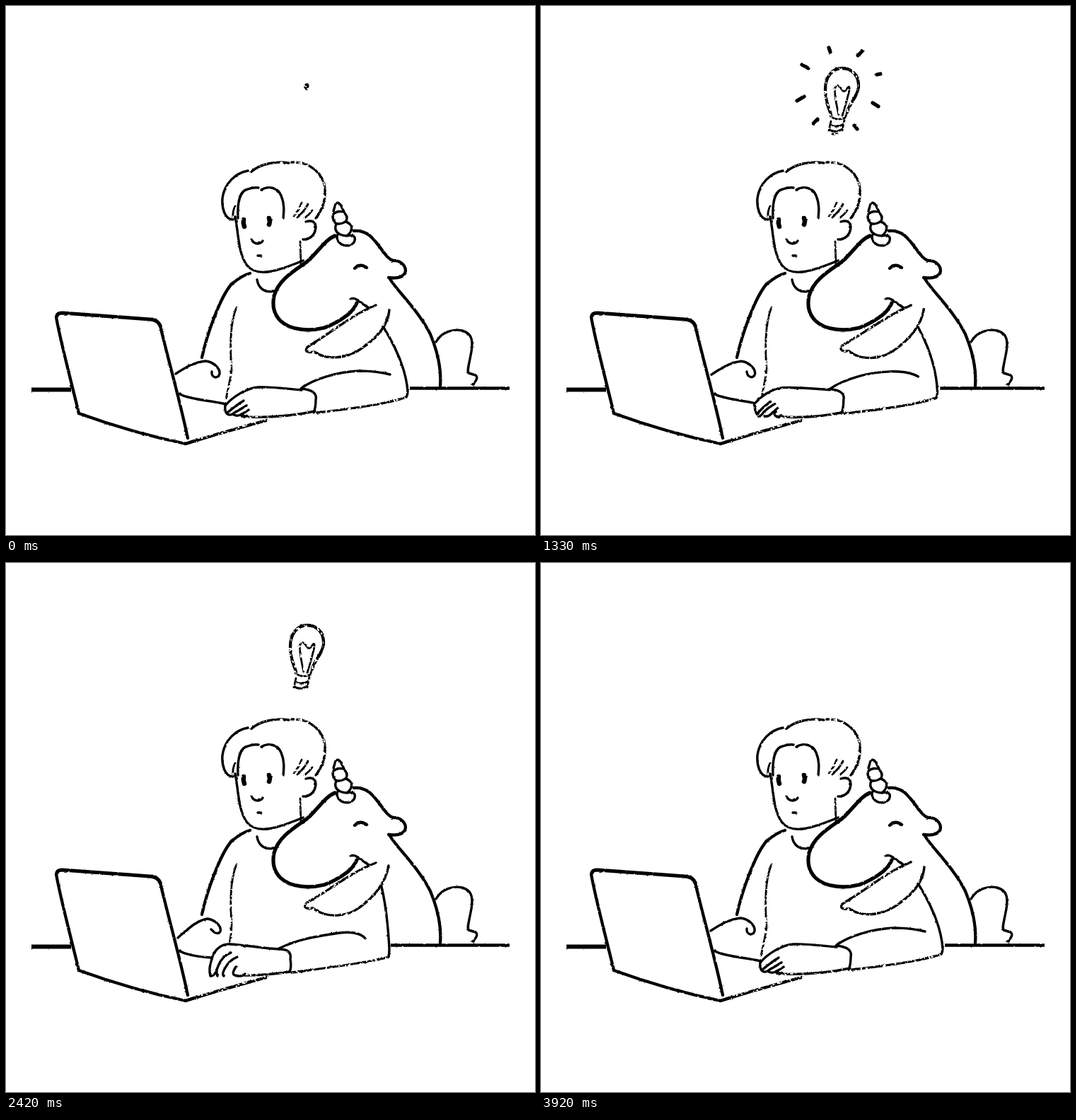
Recreate the animation shown at these times as an HTML page. Size 748 by 748 pixels, loop 4000 ms.

```html
<!DOCTYPE html>
<html lang="en">
<head>
<meta charset="utf-8">
<title>Bright idea at the laptop</title>
<style>
  html, body { margin: 0; width: 100%; height: 100%; overflow: hidden; background: #fff; }
  svg { display: block; width: 748px; height: 748px; }
  path { vector-effect: non-scaling-stroke; }
  .ink { fill: none; stroke: #000; stroke-width: 3.4; stroke-linecap: round; stroke-linejoin: round; }
  .fine { stroke-width: 2.8; }
  .bold { stroke-width: 4.3; }
  .heavy { stroke-width: 5.2; }
</style>
</head>
<body>
<svg viewBox="0 0 748 748">
  <defs>
    <filter id="rough" filterUnits="userSpaceOnUse" x="0" y="0" width="748" height="748" color-interpolation-filters="sRGB">
      <feTurbulence type="fractalNoise" baseFrequency=".2" numOctaves="2" seed="4"/>
      <feDisplacementMap in="SourceGraphic" scale="2.2" xChannelSelector="R" yChannelSelector="G"/>
    </filter>
    <filter id="dry" filterUnits="userSpaceOnUse" x="0" y="0" width="748" height="748" color-interpolation-filters="sRGB">
      <feTurbulence type="fractalNoise" baseFrequency=".25" numOctaves="2" seed="9" result="n"/>
      <feDisplacementMap in="SourceGraphic" in2="n" scale="2.4" xChannelSelector="R" yChannelSelector="G" result="d"/>
      <feColorMatrix in="n" type="matrix" values="0 0 0 0 0  0 0 0 0 0  0 0 0 0 0  0 0 0 14 -4.6"/>
      <feComposite in="d" operator="in"/>
    </filter>
    <clipPath id="bulbClip"><circle id="bulbHole" cx="425" cy="114"/></clipPath>
    <clipPath id="wireClip"><circle id="wireHole" cx="425" cy="116"/></clipPath>
  </defs>
  <rect width="748" height="748" fill="#fff"/>

  <g class="ink" filter="url(#rough)">
    <!-- desk and laptop -->
    <path d="M36 542.5H92" stroke-width="6" stroke-linecap="butt"/>
    <path id="desk" class="bold" stroke-linecap="butt"/>
    <path class="heavy" d="M72 438Q73 434 80 434L203 443Q215 444 218 452"/>
    <path class="bold" d="M71 440C76 470 92 530 103 576"/>
    <path class="bold" d="M218 452C228 495 246 558 257 611"/>
    <path class="bold" d="M103 576C150 593 205 609 254 619L266 615"/>
    <!-- face and hair -->
    <path d="M324 298C329 322 328 350 341 367C356 385 386 374 420 360"/>
    <path d="M336 302Q335 307 337 312M372 300Q374 305 372 309" style="stroke-width:6.5"/>
    <path d="M347 330Q350 336 356 336Q362 335 363 332M356 353H361"/>
    <path d="M424 305Q437 301 438 313C437 325 428 331 420 330"/>
    <path d="M328 300C327 280 330 261 342 259Q350 256 357 257M361 260C370 254 384 256 389 268C394 280 393 290 392 300"/>
    <path d="M321 302C309 302 305 285 306 272C309 250 325 236 342 233"/>
    <path d="M355 387C357 400 367 406 378 403"/>
    <path class="bold" d="M277 497C284 465 302 413 319 393C329 385 337 380 345 378"/>
    <!-- unicorn -->
    <path class="bold" d="M492 318C515 316 523 335 537 352Q544 361 551 360C562 362 567 371 564 378C559 386 548 385 541 384"/>
    <path class="heavy" d="M465 325C450 331 440 350 425 362C405 376 385 388 379 410C376 425 379 436 388 445C402 459 430 460 450 455C464 450 475 443 484 436Q492 429 496 420"/>
    <path d="M487 414Q493 412 500 418L513 427"/>
    <path class="bold" d="M493 371Q501 363 510 370"/>
    <path d="M463 290L466 280Q469 276 473 281L478 291M463 294Q470 288 478 292Q484 298 481 304Q473 310 466 307Q460 300 463 294M467 308Q464 315 468 320Q474 325 482 325Q491 318 488 311Q485 306 480 305M470 321Q466 328 470 333Q476 341 487 338Q495 334 493 327Q490 323 482 325"/>
    <path class="bold" d="M543 386C553 403 583 430 600 464C610 488 616 512 614 537"/>
    <path d="M608 475C616 461 632 456 645 459C660 463 661 475 657 494C654 510 652 515 654 519L664 522Q669 526 660 535"/>
    <path id="edge"/>
    <path id="lap"/>
    <path id="palm"/>
    <path id="hand"/>
    <path id="cuff"/>
    <path id="sleeve"/>
    <g id="fingers"></g>
    <g id="rays" class="heavy"></g>
  </g>

  <g class="ink" filter="url(#dry)">
    <path d="M254 619L300 605L368 586" class="bold"/>
    <path d="M346 235C360 222 385 219 400 222"/>
    <path d="M404 221C430 219 449 238 451 258C452 275 446 290 438 300"/>
    <path class="fine" d="M321 301Q320 290 324 283M407 297Q415 288 418 278M412 299Q422 290 427 280M422 300Q428 296 433 289M416 333L417 366"/>
    <path id="fold" class="fine"/>
    <path id="jaw"/>
    <path id="under"/>
    <path id="heel"/>
    <g id="bulb" clip-path="url(#bulbClip)">
      <g id="glass">
        <path class="bold" d="M410 155C409 146 402 140 402 118C402 100 412 88 426 88C441 88 450 100 449 115C447 130 436 137 433 150"/>
      </g>
      <g clip-path="url(#wireClip)" class="fine">
        <path d="M421 154Q416 133 415 117Q419 109 424 116Q428 124 432 118Q437 110 436 119Q432 137 426 155"/>
        <path d="M433 150L430 158M410 156Q418 163 430 158M410 163L407 176M429 161L426 176M409 168Q418 173 428 167M408 175Q416 180 426 174M412 181H419"/>
      </g>
    </g>
  </g>
</svg>
<script>
const $ = id => document.getElementById(id);
const NS = 'http://www.w3.org/2000/svg';
const LOOP = 4000, COUNT = 48;

// blend two paths that share one command structure
function mix(a, b, k) {
  const nums = b.match(/-?[\d.]+/g);
  let n = 0;
  return a.replace(/-?[\d.]+/g, v => (+v + (nums[n++] - v) * k).toFixed(2));
}

// value at frame i from [frame, value] keys
function track(keys, i) {
  let prev = keys[0];
  for (const key of keys) {
    if (i <= key[0]) {
      const span = key[0] - prev[0];
      return span ? prev[1] + (key[1] - prev[1]) * (i - prev[0]) / span : key[1];
    }
    prev = key;
  }
  return prev[1];
}

function addPath(parent) {
  return $(parent).appendChild(document.createElementNS(NS, 'path'));
}

// each part: resting, typing with curled hand, typing with open hand
const arm = {
  desk: ['M571 540.5L712 540.5', 'M549 540.5L712 540.5', 'M544 540.5L712 540.5'],
  edge: [
    'M533 453C553 485 566 518 568 545Q568 550 566 553',
    'M533 455C541 480 543 510 543 545Q543 552 542 557',
    'M531 458C537 482 540 510 542 545Q542 552 541 557'],
  under: [
    'M566 553C540 563 484 570 440 575',
    'M542 557C515 565 450 575 404 579',
    'M541 557C515 565 450 573 404 579'],
  sleeve: [
    'M417 541C435 527 470 517 500 516C520 516 535 519 543 521',
    'M386 544C415 527 450 519 480 519C496 517 506 522 511 531',
    'M386 545C415 531 440 528 465 524C486 520 502 523 508 531'],
  cuff: [
    'M418 541C434 543 440 548 438 557Q438 568 435 575',
    'M386 543C398 543 406 548 404 558Q404 572 401 578',
    'M386 546C398 546 404 550 402 560Q404 572 401 578'],
  hand: [
    'M310 565C320 553 340 540 357 539C375 538 395 541 418 543',
    'M281 561C284 552 295 543 306 541C330 540 360 542 386 542',
    'M291 560C294 546 306 538 317 539C345 541 365 545 386 546'],
  heel: ['M338 581Q390 583 437 573', 'M338 580Q365 586 402 578', 'M338 583Q370 583 401 578'],
  lap: ['M246 549C262 557 285 557 311 563', 'M246 549C256 554 270 556 283 559', 'M246 549C256 554 272 557 290 558'],
  palm: [
    'M240 520C252 512 265 504 282 502C294 503 303 513 302 520C300 528 290 526 291 517',
    'M243 524C258 515 270 505 285 503C297 505 305 514 304 521C301 527 295 523 291 517',
    'M243 530C258 517 270 505 285 503C297 505 305 514 303 521C300 526 295 523 290 518'],
  fold: [
    'M326 426C316 450 317 490 319 515C317 530 313 545 311 556',
    'M326 426C316 450 317 490 319 510C319 523 317 532 316 540',
    'M326 426C316 450 317 490 319 510C319 523 317 532 316 538']
};

const fingers = [
  ['M310 565Q309 572 312 576Q322 567 336 558', 'M284 560Q285 570 290 580Q291 570 298 563', 'M291 560Q286 574 289 584Q293 585 297 578'],
  ['M340 565Q332 570 323 575Q318 580 313 577', 'M306 558Q297 562 296 572Q293 582 295 588', 'M318 551Q305 556 300 570Q296 578 299 584'],
  ['M343 571Q338 575 333 577Q328 581 322 578', 'M316 562Q309 568 308 576Q304 582 302 584', 'M327 557Q315 562 309 574Q305 582 308 584'],
  ['M332 578Q333 580 336 580Q338 580 340 580', 'M333 564Q316 566 321 578Q330 588 337 576', 'M325 571Q318 582 324 583Q334 586 338 581']
].map(poses => ({ poses, el: addPath('fingers') }));

const jaw = {
  low: 'M523 423C490 436 460 462 431 479C420 486 423 491 436 489C452 500 478 500 500 486C520 473 540 455 542 430',
  far: 'M523 424C490 436 460 461 431 477C418 484 421 490 434 488C452 502 480 502 500 487C520 473 537 452 541 428',
  high: 'M524 421C495 436 462 459 434 475C423 481 426 488 438 487C451 499 475 498 492 490C520 474 541 450 542 430',
  farMix: [0, 1, 1, .8, .5, 0, 0],
  highMix: [0, 0, .3, .6, .9, 1, .1]
};

// ray: start point and direction
const rays = [
  [407, 59, 2, 6], [454, 64, -6, 6], [369, 83, 9, 5], [475, 97, 5, -1],
  [362, 134, 10, -6], [469, 137, 8, 5], [385, 166, 6, -6], [443, 169, 4, 5]
].map(r => ({ r, el: addPath('rays') }));

const reach = [[8, 0], [10, 1], [11, .7], [12, .18], [13, 0], [15, 0], [17, .6], [19, 1], [21, 1],
  [24, 0], [26, 0], [28, 1], [30, 1], [32, .5], [34, 0]];
const size = [[0, .06], [2, .5], [5, 1], [29, 1], [35, .5], [36, .2], [37, 0]];
const hole = [[0, 5], [2, 14], [5, 44], [8, 76], [28, 76], [29, 66], [32, 38], [35, 14], [37, 4]];
const wire = [[0, 4], [5, 9], [6, 22], [8, 76], [28, 76], [29, 64], [35, 14]];

function draw(ms) {
  const i = Math.floor((ms % LOOP) / LOOP * COUNT + .05) % COUNT;

  const u = track(reach, i);
  const pose = i % 2 ? 2 : 1;
  const shape = p => mix(p[0], p[pose], u);
  for (const id in arm) $(id).setAttribute('d', shape(arm[id]));
  for (const f of fingers) f.el.setAttribute('d', shape(f.poses));

  const phase = Math.min(6, i % 7 + (i > 44 ? 1 : 0));
  $('jaw').setAttribute('d', mix(mix(jaw.low, jaw.far, jaw.farMix[phase]), jaw.high, jaw.highMix[phase]));

  const s = track(size, i);
  $('bulb').style.display = s > 0 ? '' : 'none';
  $('glass').setAttribute('transform', `translate(425 113) scale(${Math.max(s, .01)}) translate(-425 -113)`);
  $('bulbHole').setAttribute('r', track(hole, i));
  $('wireHole').setAttribute('r', track(wire, i));

  $('rays').style.display = i > 8 && i < 29 ? '' : 'none';
  const out = i % 4 < 2 ? 0 : 4;
  for (const { r: [x, y, dx, dy], el } of rays) {
    const d = Math.hypot(x - 425, y - 114);
    el.setAttribute('d', `M${x + (x - 425) / d * out} ${y + (y - 114) / d * out}l${dx} ${dy}`);
  }
}

const start = performance.now();
function tick() {
  draw(performance.now() - start);
  requestAnimationFrame(tick);
}
draw(0);
requestAnimationFrame(tick);
</script>
</body>
</html>
```
